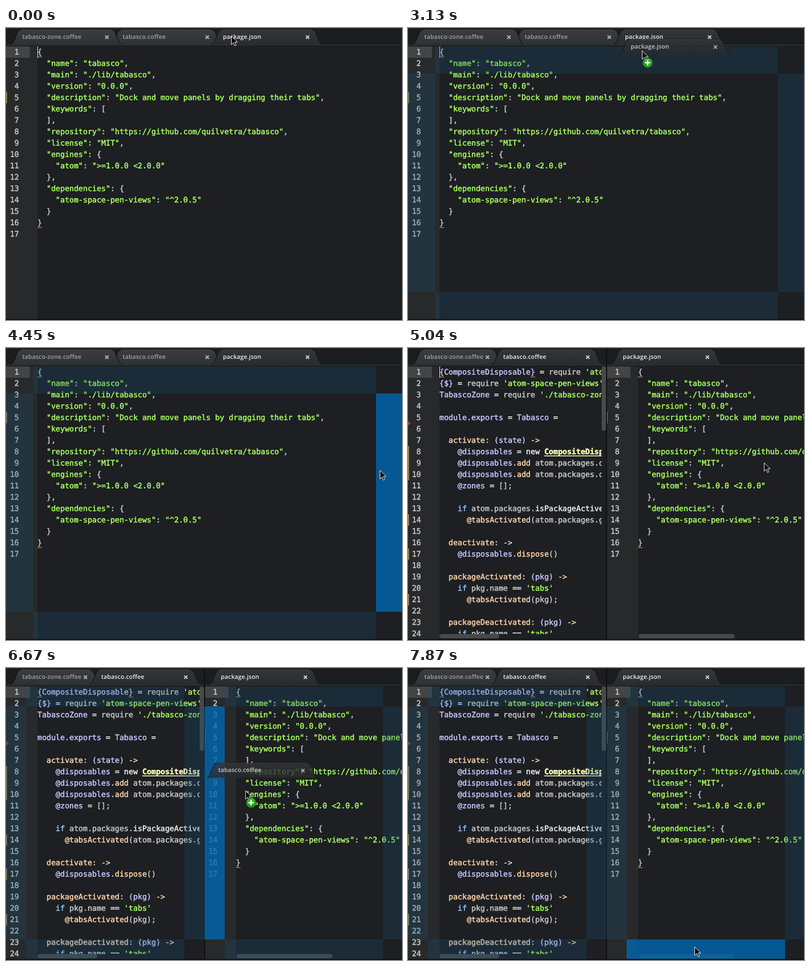
Write an HTML page that moves like this. It is 730 by 539 pixels and loops after 8000 ms.

```html
<!DOCTYPE html>
<html lang="en">
<head>
<meta charset="utf-8">
<title>Docking editor panels</title>
<style>
  html, body { margin: 0; width: 100%; height: 100%; overflow: hidden; background: #1d1f22; }
  svg { display: block; }
  text { white-space: pre; text-rendering: geometricPrecision; fill: currentColor; }
  .code { font: 14px "DejaVu Sans Mono", monospace; letter-spacing: -.028px; color: #c5c8c6; stroke: currentColor; stroke-width: .5; }
  .tab { font: 600 11px "Open Sans", sans-serif; letter-spacing: .15px; }
  tspan { fill: currentColor; stroke: currentColor; }
  .str { color: #a8ff60; }
  .key { color: #96cbfe; }
  .fn { color: #ffd2a7; }
  .cls { color: #ffffb6; font-weight: bold; }
  .var { color: #c6c5fe; }
  .op { color: #ededed; }
</style>
</head>
<body>
<svg id="stage" width="730" height="539" viewBox="0 0 730 539">
  <defs>
    <linearGradient id="idle" x2="0" y2="1"><stop stop-color="#3b3c3e"/><stop offset="1" stop-color="#303133"/></linearGradient>
    <linearGradient id="active" x2="0" y2="1"><stop stop-color="#343537"/><stop offset="1" stop-color="#292b2d"/></linearGradient>
    <radialGradient id="green" cy=".35"><stop stop-color="#4cc53c"/><stop offset="1" stop-color="#259a20"/></radialGradient>
  </defs>
</svg>
<script>
const CHAR = 8.4, LINE = 21, LOOP = 8000, TICK = LOOP / 54;
const stage = document.getElementById('stage');

const json = `{
  "name": "tabasco",
  "main": "./lib/tabasco",
  "version": "0.0.0",
  "description": "Dock and move panels by dragging their tabs",
  "keywords": [
  ],
  "repository": "https://github.com/quilvetra/tabasco",
  "license": "MIT",
  "engines": {
    "atom": ">=1.0.0 <2.0.0"
  },
  "dependencies": {
    "atom-space-pen-views": "^2.0.5"
  }
}
`.split('\n');

const coffee = `{CompositeDisposable} = require 'atom'
{$} = require 'atom-space-pen-views'
TabascoZone = require './tabasco-zone'

module.exports = Tabasco =

  activate: (state) ->
    @disposables = new CompositeDisposable
    @disposables.add atom.packages.onDidActivatePackage
    @disposables.add atom.packages.onDidDeactivatePackage
    @zones = [];

    if atom.packages.isPackageActive('tabs')
      @tabsActivated(atom.packages.getActivePackage('tabs'))

  deactivate: ->
    @disposables.dispose()

  packageActivated: (pkg) ->
    if pkg.name == 'tabs'
      @tabsActivated(pkg);

  packageDeactivated: (pkg) ->
    if pkg.name == 'tabs'`.split('\n');

const classes = ['str', 'key', 'fn', 'cls', 'var', 'op'];
const tokens = /('[^']*'|"[^"]*")|(\bif\b)|(->|\w+(?=:)|@tabsActivated|\b(?:add|dispose)\b)|(CompositeDisposable(?!\}))|(\{[\w$]+\}|@\w+|module\.exports|Tabasco\w*|\(\w+\)(?= ->))|(==?|\bnew\b|\bis\w+)/g;

const escape = s => s.replace(/&/g, '&amp;').replace(/</g, '&lt;').replace(/>/g, '&gt;');
const rect = (x, y, w, h, fill, more = '') =>
  `<rect x="${x}" y="${y}" width="${w}" height="${h}" fill="${fill}" ${more}/>`;
const group = (id, body, more = '') => `<g id="${id}" ${more}>${body}</g>`;

function codeLine(src, x, row) {
  let out = '', end = 0;
  const put = (s, col, cls = '') => {
    const word = s.trimStart();
    if (word) out += `<tspan x="${x + (col + s.length - word.length) * CHAR}" class="${cls}">${escape(word)}</tspan>`;
  };
  for (const m of src.matchAll(tokens)) {
    put(src.slice(end, m.index), end);
    put(m[0], m.index, classes[m.slice(1).findIndex(Boolean)]);
    end = m.index + m[0].length;
  }
  put(src.slice(end), end);
  return `<text class="code" y="${49 + row * LINE}">${out}</text>`;
}

// x is the left edge of the label, w the tab's share of the bar
function tab(name, x, w, on) {
  const r = x + w - 4, cx = x + w - 29;
  const edge = `M${x - 20} 30Q${x - 17} 29 ${x - 15} 25L${x - 8} 8Q${x - 6} 3.5 ${x - 1} 3.5` +
    `H${r - 18}Q${r - 13} 3.5 ${r - 11} 8L${r - 4} 25Q${r - 2} 29 ${r + 1} 30`;
  return `<path d="${edge}" fill="none" stroke="#131415" stroke-width="2.5"/>` +
    `<path d="${edge}Z" fill="url(#${on ? 'active' : 'idle'})"/>` +
    `<path d="M${x - 2} 3.5H${r - 17}" stroke="#4b4c4e"/>` +
    `<text class="tab" x="${x}" y="20" color="${on ? '#eeeeee' : '#a2a3a4'}">${name}</text>` +
    `<path d="M${cx - 3} 14l6 6m0-6l-6 6" stroke="${on ? '#cfcfcf' : '#b4b4b4'}" stroke-width="2"/>`;
}

const thumb = (x, y, w, h) => rect(x, y, w, h, '#47494b', 'rx="4"');
const underline = (x, row, fill) => rect(x, 53 + (row - 1) * LINE, CHAR, 1, fill);

function pane(x, w, tabs, lines, marks, clipRight) {
  const id = 'clip' + x + w;
  const numbers = lines.map((_, i) => {
    const n = String(i + 1);
    return `<text class="code" x="${x + 24 - n.length * CHAR}" y="${49 + i * LINE}" color="${i ? '#85878a' : '#e6e6e6'}">${n}</text>`;
  }).join('');
  return `<clipPath id="${id}">${rect(x + 50, 34, clipRight - x - 50, 494)}</clipPath>` +
    rect(x, 0, w, 539, '#1d1f22') + rect(x, 0, w, 30, '#1c1d1e') + rect(x, 0, w, 1, '#2a2b2c') +
    rect(x, 29, w, 1, '#131415') +
    tabs.map(t => tab(...t)).join('') +
    rect(x, 30, w, 3, '#292b2d') + rect(x, 33, w, 1, '#151617') +
    rect(x, 34, 58, 503, '#28292b') + rect(x, 34, 44, LINE, '#434446') +
    marks.map(n => rect(x, 13 + n * LINE, 2, LINE, '#94804a')).join('') + numbers +
    `<g clip-path="url(#${id})">${lines.map((s, i) => codeLine(s, x + 58, i)).join('')}</g>`;
}

const jsonPane = (x, w, tabs) => pane(x, w, tabs, json, [5], 730) +
  underline(x + 58, 1, '#b9b9b5') + underline(x + 58, 16, '#c9a64e');

// the four drop strips of a pane: top, left, right, bottom
function zones(x, w, m) {
  const top = 34, bottom = 537.4, r = x + w;
  return [[x + m, top, r - m, top + m], [x, top + m, x + m, bottom - m],
    [r - m, top + m, r, bottom - m], [x + m, bottom - m, r - m, bottom]].map(z => z.map(Math.round));
}
const wide = zones(0, 732, 50);
const halves = [...zones(0, 366, 36.6), ...zones(366, 366, 36.6)];
const strips = (list, id) =>
  group(id, list.map(([x, y, r, b]) => rect(x, y, r - x, b - y, '#155379')).join(''));

const base = rect(0, 537, 730, 2, '#111213');
const single = jsonPane(0, 730, [
  ['tabasco.coffee', 215, 185], ['tabasco-zone.coffee', 30, 185], ['package.json', 400, 185, 1]
]) + base;

const split = pane(0, 366, [
  ['tabasco-zone.coffee', 30, 145.5], ['tabasco.coffee', 175.5, 185, 1]
], coffee, [8, 9, 10, 14, 17, 21], 357) +
  underline(58, 1, '#c9a64e') + underline(58 + 20 * CHAR, 1, '#c9a64e') +
  rect(251, 198.5, 106, 1.5, '#ffffb6') + '<path d="M0 134.5l5 4.5l-5 4.5Z" fill="#8e4a40"/>' +
  thumb(357, 34, 8, 119) + thumb(58, 528, 110, 8) +
  jsonPane(366, 364, [['package.json', 396, 185, 1]]) +
  thumb(425, 528, 177, 8) + base + rect(365, 0, 2, 539, '#0f1011');

stage.innerHTML += group('single', single) + group('split', split) +
  rect(58, 34, 1, LINE, '#f0f0f0', 'id="caret"') +
  strips(wide, 'wide') + strips(halves, 'halves') +
  group('ghostJson', tab('package.json', 400, 185, 1), 'opacity=".8"') +
  group('ghostCoffee', tab('tabasco.coffee', 175.5, 185, 1), 'opacity=".8"') +
  group('mouse',
    '<path d="M0 0V15.5L3.6 12L6.2 17.9L8.7 16.8L6.2 11H11.2Z" fill="#080808" stroke="#f4f4f4" stroke-linejoin="round"/>' +
    group('badge', '<circle cx="10" cy="22" r="9" fill="url(#green)" stroke="#1c7a1a" stroke-width=".6"/>' +
      '<path d="M5 22h10m-5-5v10" stroke="#fff" stroke-width="2.4"/>'));

const $ = id => document.getElementById(id);
const show = (id, on) => $(id).setAttribute('visibility', on ? 'visible' : 'hidden');
const place = (id, x, y) => $(id).setAttribute('transform', `translate(${x} ${y})`);

// pointer gestures, timed in ticks; each starts where the last one ended
const home = [415.5, 15];
const moves = [
  { from: 12, till: 16, to: [417.5, 17] },
  { from: 19, till: 28, via: [461, 116], to: [710, 226], lag: 16 },
  { from: 29, till: 30, to: [689.5, 226] },
  { from: 33, till: 41, via: [300, 60], to: [221.5, 15] },
  { from: 42, till: 49, via: [575, 296], to: [554, 515], lag: 40 },
  { from: 52, till: 53, to: [528.5, 515] }];
// caret blinking restarts when a drag begins and when the pane splits
const blinks = [{ from: -1.5, half: 2.5 }, { from: 19, half: 3 }, { from: 32, half: 2.33 }];

function pointer(tick) {
  let pos = home, lag = 0;
  for (const m of moves) {
    if (tick <= m.from) break;
    const u = Math.min(1, (tick - m.from) / (m.till - m.from)), s = u * u * (3 - 2 * u);
    const via = m.via || m.to;
    pos = pos.map((p, i) => (1 - s) ** 2 * p + 2 * s * (1 - s) * via[i] + s * s * m.to[i]);
    lag = 4 * s * (1 - s) * (m.lag || 0);
  }
  return [...pos, lag];
}

function light(id, list, [px, py]) {
  [...$(id).children].forEach((el, n) => {
    const [x, y, r, b] = list[n], hit = px >= x && px < r && py >= y && py < b;
    el.setAttribute('fill', hit ? '#0067b0' : '#155379');
    el.setAttribute('opacity', hit ? .8 : .25);
  });
}

function draw(t) {
  const tick = Math.floor(t / TICK + .02);
  const [x, y, lag] = pointer(tick);
  const isSplit = tick >= 32;
  const first = tick >= 20 && tick < 30, second = tick >= 43 && tick < 53;
  const blink = blinks.findLast(b => b.from <= tick);
  show('single', !isSplit);
  show('split', isSplit);
  show('caret', Math.floor((tick - blink.from) / blink.half) % 2 === 0);
  show('wide', tick >= 20 && !isSplit);
  show('halves', tick >= 43);
  // strips and the dragged tab respond a little behind the pointer
  light('wide', wide, pointer(tick - .5));
  light('halves', halves, pointer(tick - .5));
  show('ghostJson', first);
  show('ghostCoffee', second);
  place('ghostJson', x - 421, y - lag - 17);
  place('ghostCoffee', x - 226, y - lag - 16);
  place('mouse', x, y);
  show('badge', first || second);
}

function tick(now) {
  draw(now % LOOP);
  requestAnimationFrame(tick);
}
draw(0);
requestAnimationFrame(tick);
</script>
</body>
</html>
```
